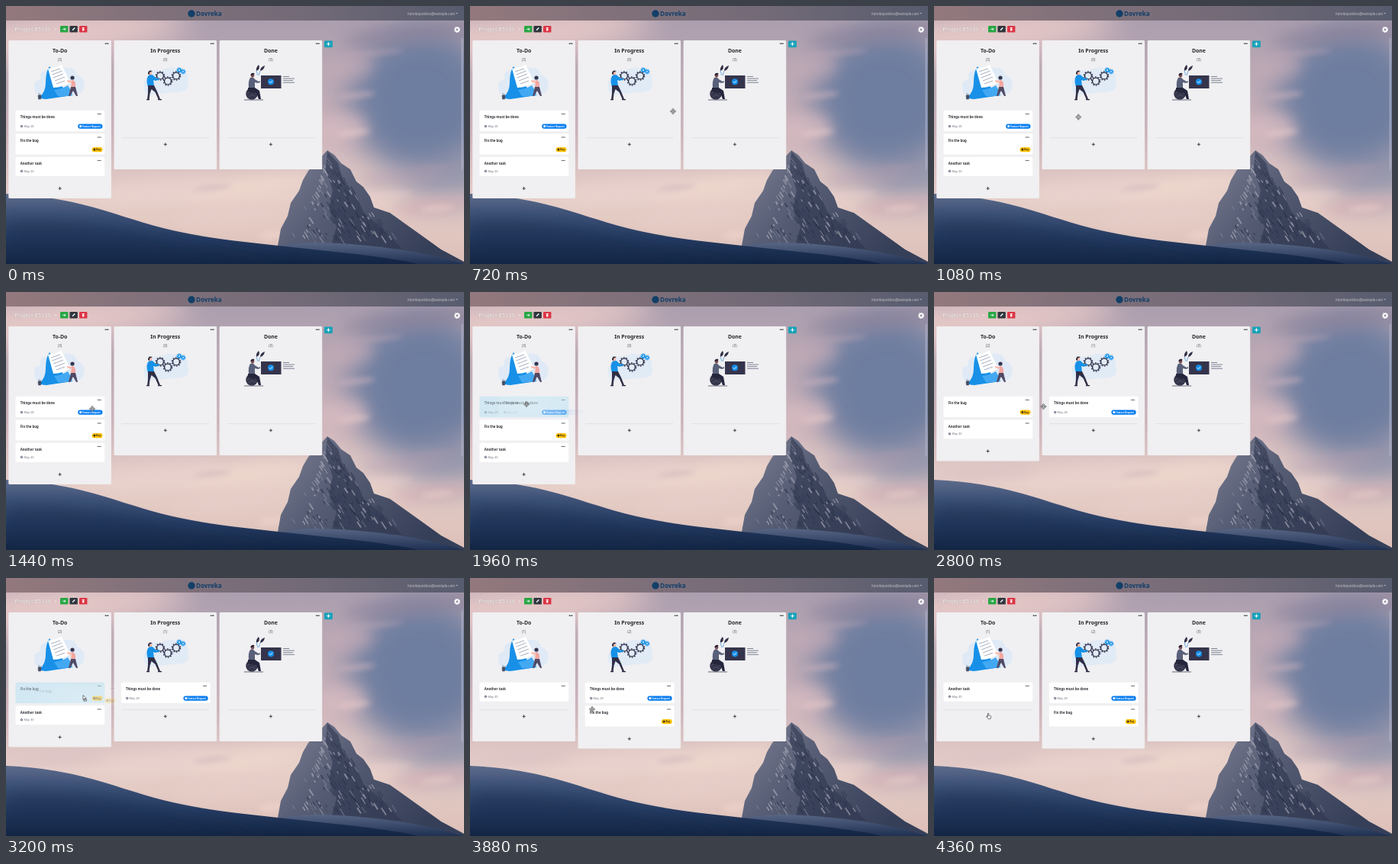
These frames come from a looping animation (600 by 338 pixels, 4.4 s). An HTML page:

```html
<!DOCTYPE html>
<html lang="en">
<head>
<meta charset="utf-8">
<title>Kanban board</title>
<style>
html, body { margin: 0; width: 100%; height: 100%; overflow: hidden; background: #a798a8; }
svg { display: block; width: 100%; height: 100%; font-family: "Noto Sans", "Open Sans", sans-serif; }
.title { font-size: 6.9px; font-weight: 600; fill: #24272c; text-anchor: middle; }
.count { font-size: 4.4px; fill: #55585e; text-anchor: middle; }
.name { font-size: 4.35px; font-weight: 600; fill: #2f3338; }
.date { font-size: 3.9px; fill: #70757f; }
.tag { font-size: 2.9px; font-weight: 700; }
</style>
</head>
<body>
<svg id="stage" viewBox="0 0 600 338" preserveAspectRatio="none">
  <defs>
    <linearGradient id="sky" x2="0" y2="1">
      <stop offset="0" stop-color="#a79bac"/><stop offset=".22" stop-color="#b7a6b3"/>
      <stop offset=".5" stop-color="#ccb3ba"/><stop offset=".74" stop-color="#e7d0c9"/>
      <stop offset="1" stop-color="#dcbfb8"/>
    </linearGradient>
    <linearGradient id="snow" x2="0" y2="1">
      <stop offset="0" stop-color="#5d6b8b"/><stop offset=".25" stop-color="#41557a"/>
      <stop offset=".65" stop-color="#243a60"/><stop offset="1" stop-color="#122442"/>
    </linearGradient>
    <linearGradient id="farSnow" x2="0" y2="1">
      <stop offset="0" stop-color="#586584"/><stop offset="1" stop-color="#1f3052"/>
    </linearGradient>
    <linearGradient id="rock" x2="1" y2=".5">
      <stop offset="0" stop-color="#85869a"/><stop offset=".45" stop-color="#565d74"/>
      <stop offset="1" stop-color="#363f58"/>
    </linearGradient>
    <linearGradient id="bar">
      <stop offset="0" stop-color="#93797d"/><stop offset=".35" stop-color="#7f707a"/>
      <stop offset=".65" stop-color="#736a77"/><stop offset="1" stop-color="#575c6e"/>
    </linearGradient>
    <filter id="haze" x="-50%" y="-60%" width="200%" height="220%"><feGaussianBlur stdDeviation="20"/></filter>
    <filter id="soft" x="-50%" y="-100%" width="200%" height="300%"><feGaussianBlur stdDeviation="9"/></filter>
    <filter id="wisp" x="-50%" y="-100%" width="200%" height="300%"><feGaussianBlur stdDeviation="3.5"/></filter>
    <radialGradient id="fade">
      <stop offset="0" stop-color="#fff"/><stop offset="1" stop-color="#fff" stop-opacity="0"/>
    </radialGradient>
    <mask id="halo" maskUnits="userSpaceOnUse" x="-80" y="-40" width="160" height="80">
      <ellipse rx="78" ry="38" fill="url(#fade)"/>
    </mask>
  </defs>

  <rect width="600" height="338" fill="url(#sky)"/>
  <g id="clouds"></g>
  <path d="M421 189L430 195 439 206 451 214 459 230 468 237 477 250 482 264 503 271 524 286 545 301 570 319 600 335V338H340L356 314 360 292 369 275 373 258 384 242 389 228 396 216 408 203z" fill="url(#rock)"/>
  <g id="ridges"></g>
  <path d="M330 322Q365 310 405 310T500 317 600 338H330z" fill="url(#farSnow)"/>
  <path d="M0 246Q52 248 100 260C140 270 170 282 206 291Q250 302 312 309T440 323 540 338H0z" fill="url(#snow)"/>
  <path d="M0 280Q90 274 180 300T390 338H0z" fill="#152a4c" opacity=".4" filter="url(#soft)"/>

  <rect width="600" height="19" fill="url(#bar)"/>
  <rect x="596.6" y="42" width="2" height="173" rx="1" fill="#b0b3c6" opacity=".7"/>
  <circle cx="243" cy="10" r="4.7" fill="#123f68"/>
  <text x="249" y="13.2" font-size="8.1" font-weight="700" fill="#123f68">Dovreka</text>
  <text x="588" y="11.6" font-size="4.6" font-style="italic" fill="#c3c2c9" text-anchor="end">harolinpostbox@example.com</text>
  <path d="M589.4 9h2.6l-1.3 1.5z" fill="#c3c2c9"/>
  <text x="11.5" y="33" font-size="7.4" fill="#fff" style="text-shadow: 0 0 1px #5558">Project 85139</text>
  <path d="M63.8 29.7h2.4l-1.2 1.4z" fill="#fff"/>
  <g fill="none" stroke="#fff" stroke-width=".9">
    <rect x="71" y="26" width="10.4" height="8.6" rx="1.2" fill="#28a745" stroke="none"/>
    <path d="M74.3 30.3h3.7m-1.5-1.5l1.5 1.5-1.5 1.5"/>
    <rect x="83.4" y="26" width="10.4" height="8.6" rx="1.2" fill="#30363d" stroke="none"/>
    <path d="M87 31.8l3.3-3.3" stroke-width="1.3"/>
    <rect x="96" y="26" width="10.4" height="8.6" rx="1.2" fill="#dc3545" stroke="none"/>
    <path d="M99.5 28.6h3.4m-1.7-.6v.5"/><path d="M100 29.4h2.4v3H100z" fill="#fff" stroke="none"/>
    <rect x="417" y="45.4" width="10.8" height="8.8" rx="1.2" fill="#17a2b8" stroke="none"/>
    <path d="M420.2 49.8h4.4m-2.2-2.2v4.4" stroke-width="1.1"/>
    <circle cx="591" cy="31" r="2.3" stroke-width="1.7"/>
    <circle cx="591" cy="31" r="3.5" stroke-width="1.1" stroke-dasharray="1.4 1.35"/>
  </g>

  <g id="columns"></g>

  <g transform="translate(37 76)">
    <path d="M0 30Q-1 22 8 20Q6 9 17 8Q28 1 39 5Q54 3 56 14Q68 19 65 31Q64 40 48 42L10 44Q0 40 0 30z" fill="#dfeaf6"/>
    <path d="M7 43Q15 37 15 24Q15 10 20 3L37 30Q40 41 50 41L16 46Q8 46 7 43z" fill="#1890e8"/>
    <path d="M18 6Q27 5 36 1L47 24Q37 31 25 31z" fill="#fff"/>
    <path d="M22 10l12-4M23.5 14l13-5M25 18l13-5M27 22l13-5M29 26l11-4" stroke="#8d99ae" stroke-width=".8"/>
    <path d="M26 34q10-1 18-6 5 8 6 13-11 2-19 1z" fill="#43a8f2"/>
    <path d="M43 21l6 1-1 3-5-2z" fill="#ffbbad"/>
    <circle cx="50" cy="18" r="2.6" fill="#34344e"/>
    <path d="M49 21q6 0 5 9l-6 1z" fill="#f3a7a0"/>
    <path d="M48 30h6l3 12h-2l-4-7-4 7h-2z" fill="#514a66"/>
    <path d="M5 41h4l-.5 5h-3zM7 42l-1-4m1 4l2-3" fill="#454d64" stroke="#454d64" stroke-width=".6"/>
  </g>

  <g transform="translate(178 76)">
    <path d="M3 31Q1 21 10 17Q9 6 24 9Q39 1 49 9Q62 9 60 22Q64 33 52 36L12 40Q4 40 3 31z" fill="#e1ebf6"/>
    <g id="gears" fill="none"></g>
    <path d="M8 16q3-4 7-1l4 4 4-1v2l-5 2-3-1 1 8-8 1q-3-9 0-14z" fill="#1691e8"/>
    <circle cx="11" cy="12" r="2.4" fill="#ffb9a8"/><path d="M8 13q0-6 6-4l-4 2v3z" fill="#29293f"/>
    <path d="M8 28h8l4 8 4 10h-2.5l-4-9-5-4-2 6-1 8H7l1-9z" fill="#2f2e47"/>
    <path d="M6 46.6h4m11 0h5" stroke="#26263c" stroke-width="1.2"/>
  </g>

  <g transform="translate(312 76)">
    <path d="M16 9q-1-4 3-8 3 5-3 8zM21 9q0-5 6-7-1 6-6 7z" fill="#2f2e47"/>
    <path d="M16 9l2 6m3-6l-2 6" stroke="#2089df" stroke-width=".6"/>
    <circle cx="10" cy="39" r="7.8" fill="#35354b"/><path d="M4 39q6-7 12 0m-10 4q5-5 9 0" fill="none" stroke="#555970" stroke-width=".8"/>
    <circle cx="11" cy="15" r="2.4" fill="#7f4e50"/><path d="M8.5 15q0-4 5-3l-1 2z" fill="#222238"/>
    <path d="M8 18q4-2 6 2l5 3 2-1v2l-3 1-4-1v7H6q-1-9 2-13z" fill="#59607a"/>
    <path d="M5 31h9l6 4 2 11h-3l-3-8-7-1-4-1z" fill="#25263d"/>
    <path d="M0 47h25" stroke="#42455d" stroke-width=".8"/>
    <rect x="22" y="15" width="26.5" height="17" fill="#34344c"/>
    <circle cx="35" cy="23.2" r="4" fill="#168ee9"/>
    <path d="M33 23.2l1.5 1.6 2.7-3" fill="none" stroke="#fff" stroke-width=".9"/>
    <path d="M51 16.5h8m-8 2.6h15m-15 2.6h13m-13 2.6h15" stroke="#626b7d" stroke-width=".8"/>
  </g>

  <g id="cards"></g>
  <g id="drag" mask="url(#halo)"><use id="dragCard"/></g>
  <g id="cursor">
    <path id="moveIcon" d="M0-3.8l1.3 1.6H.6V-.6h1.6v-.7L3.8 0 2.2 1.3V.6H.6v1.6h.7L0 3.8-1.3 2.2h.7V.6h-1.6v.7L-3.8 0l1.6-1.3v.7h1.6v-1.6h-.7z" fill="#fff" stroke="#25282d" stroke-width=".6"/>
    <g id="arrowIcon" stroke="#25282d" stroke-width=".6" fill="#fff"><path d="M-1-3.5v6l1.5-1.4 1 2.2.9-.4-1-2.1h2z"/><path d="M0 2.2h3.5v2H0z"/></g>
    <path id="handIcon" d="M-.9-3.5q.8-.7 1.3 0v2.4l2.6.8q.6.4.3 1.4L2.7 3.6H-.4l-2-3q.2-1 1.5.1z" fill="#fff" stroke="#25282d" stroke-width=".6"/>
  </g>
</svg>
<script>
const $ = id => document.getElementById(id);
const LOOP = 4400, SLIDE = 150, TOP = 136.8, GAP = 3.3;
const COL_X = [3.3, 141.5, 279.6];

const CARDS = {
  things: { name: 'Things must be done', date: 'May 28', height: 27.2, dateY: 22.1, tag: ['Feature Request', 32.3, '#087df1', '#fff'] },
  fix: { name: 'Fix the bug', height: 27.2, tag: ['Bug', 14, '#ffc107', '#3c3316'] },
  another: { name: 'Another task', date: 'May 30', height: 25, dateY: 19.8 }
};

// Board order after each move, with the time the move takes effect.
const ORDERS = [
  { at: 0, lists: [['things', 'fix', 'another'], [], []] },
  { at: 2280, lists: [['fix', 'another'], ['things'], []] },
  { at: 3480, lists: [['another'], ['things', 'fix'], []] }
];
const DRAGS = [
  { card: 'things', from: 1760, to: 2600 },
  { card: 'fix', from: 3100, to: 3700 }
];
// Pointer stops: time, x, y
const PATH = [
  [0, 616, 150], [200, 606, 150], [720, 266, 138], [1440, 113, 153], [1760, 49, 147],
  [2000, 76, 147], [2280, 170, 145], [2400, 181, 145], [2600, 186, 147],
  [3040, 88, 154], [3100, 85, 154], [3200, 102, 157], [3480, 150, 170],
  [3700, 162, 174], [3880, 160, 172], [4240, 73, 181], [4400, 71, 181]
];

const clamp = v => Math.max(0, Math.min(1, v));
const mix = (a, b, p) => a + (b - a) * p;
const easeOut = p => 1 - (1 - p) ** 2;
const smooth = p => p * p * (3 - 2 * p);
const show = (id, on) => $(id).setAttribute('visibility', on ? 'visible' : 'hidden');
const move = (el, x, y) => el.setAttribute('transform', `translate(${x.toFixed(2)} ${y.toFixed(2)})`);
const dots = (x, y, r = .65) => [-1.7, 0, 1.7].map(d => `<circle cx="${x + d}" cy="${y}" r="${r}" fill="#24272c"/>`).join('');

function drawScenery() {
  const hazes = [
    [50, 40, 190, 30, '#edcdca', .95], [545, 125, 95, 95, '#6b7b9f', .95], [590, 225, 70, 35, '#8189a6', .7]
  ];
  const clouds = [
    [540, 36, 100, 12, '#8a8099', .6], [448, 80, 34, 16, '#c6acb8', .6], [440, 160, 34, 18, '#d9bcc2', .7],
    [520, 225, 60, 10, '#b29fb0', .6], [560, 262, 55, 12, '#d1afb5', .75],
    [320, 236, 85, 13, '#f0d9ce', .8], [200, 240, 80, 12, '#e9d3cf', .8], [60, 239, 70, 9, '#d8bfc5', .6],
    [290, 275, 75, 14, '#e8cec8', .7]
  ];
  const wisps = [
    [480, 62, 40, 3, '#b9a4b3'], [458, 117, 26, 4, '#cdb3bd'], [455, 166, 22, 4, '#e8cbc9'],
    [560, 212, 34, 3, '#a497ab'], [500, 248, 32, 3, '#e3c9ca'], [565, 265, 22, 4, '#ecd0cb'],
    [350, 300, 20, 5, '#f0d5cc'], [270, 238, 25, 3, '#c8aeb8']
  ];
  const ellipses = (list, filter) => list.map(([x, y, rx, ry, fill, opacity = .6]) =>
    `<ellipse cx="${x}" cy="${y}" rx="${rx}" ry="${ry}" fill="${fill}" opacity="${opacity}" filter="url(#${filter})" transform="rotate(-6 ${x} ${y})"/>`).join('');
  $('clouds').innerHTML = ellipses(hazes, 'haze') + ellipses(clouds, 'soft') + ellipses(wisps, 'wisp');

  let seed = 17;
  const random = () => (seed = seed * 16807 % 2147483647) / 2147483647;
  let streaks = '<path d="M421 190l14 16 7 24 16 17 11 24 23 20 27 27H425l8-29-10-22 5-25-9-28z" fill="#2f3850" opacity=".6"/>';
  for (let i = 0; i < 150; i++) {
    const depth = Math.sqrt(random()), y = 198 + depth * 105;
    const side = random(), x = 421 - depth * 50 + side * depth * 140;
    const length = 2 + random() * 8, light = random() > .35 + side * .4;
    streaks += `<path d="M${x.toFixed(1)} ${y.toFixed(1)}l${(length * .65).toFixed(1)} ${length.toFixed(1)}" stroke="${light ? '#b6b3c0' : '#2a334a'}" stroke-width="${(.6 + random() * 1.5).toFixed(1)}" opacity=".6"/>`;
  }
  $('ridges').innerHTML = streaks;
}

function drawGears() {
  const gear = (x, y, r, color, rim) =>
    `<g stroke="${color}"><circle cx="${x}" cy="${y}" r="${r}" stroke-width="${rim}"/>` +
    `<circle cx="${x}" cy="${y}" r="${r + 1.2}" stroke-width="1.4" stroke-dasharray="${(r + 1.2) * Math.PI / 10}"/></g>`;
  $('gears').innerHTML = gear(24, 15.5, 4.4, '#34344c', 1.4) + gear(34, 22.5, 4.4, '#34344c', 1.4) +
    gear(45, 15.5, 4.4, '#34344c', 1.4) + gear(49, 8, 1.8, '#1795ec', 1.6) + gear(54, 10, 1.6, '#1795ec', 1.4);
}

function drawColumns() {
  $('columns').innerHTML = ['To-Do', 'In Progress', 'Done'].map((title, i) => `
    <g transform="translate(${COL_X[i]} 0)">
      <rect id="panel${i}" y="45" width="134.6" rx="1.5" fill="#f0eff1"/>
      ${dots(128.7, 49.2, .75)}
      <text class="title" x="67.3" y="61.2">${title}</text>
      <text class="count" id="count${i}" x="67.3" y="72.4"></text>
      <path d="M10 172.6h115" stroke="#dcdcdf" stroke-width=".7"/>
      <path id="plus${i}" d="M65.2 0h4.2m-2.1-2.1v4.2" stroke="#303338" stroke-width=".9"/>
    </g>`).join('');
}

function drawCards() {
  $('cards').innerHTML = Object.entries(CARDS).map(([id, card]) => {
    let body = `<text class="name" x="6.2" y="10.5">${card.name}</text>${dots(109.8, 4.6, .6)}`;
    if (card.date) body += `<circle cx="8" cy="${card.dateY - 1.4}" r="1.7" fill="#7b8292"/>
      <path d="M8 ${card.dateY - 2.4}v1.1h.8" stroke="#fff" stroke-width=".4" fill="none"/>
      <text class="date" x="10.9" y="${card.dateY}">${card.date}</text>`;
    if (card.tag) {
      const [label, width, fill, ink] = card.tag, x = 114 - width;
      body += `<rect x="${x}" y="17.6" width="${width}" height="6.4" rx="3.2" fill="${fill}"/>
        <circle cx="${x + 3.4}" cy="20.8" r="1.5" fill="${ink}"/>
        <text class="tag" x="${x + 5.8}" y="21.9" fill="${ink}">${label}</text>`;
    }
    return `<g id="${id}"><g id="${id}Face"><rect width="116.8" height="${card.height}" rx="1.6"/><g id="${id}Body">${body}</g></g></g>`;
  }).join('');
}

function slots(lists) {
  const places = {};
  const ends = lists.map((list, i) => {
    let y = TOP;
    for (const id of list) {
      places[id] = [COL_X[i] + 9.2, y];
      y += CARDS[id].height + GAP;
    }
    return y - GAP;
  });
  return { places, ends };
}

function pointer(t) {
  const i = Math.max(1, PATH.findIndex(p => p[0] >= t));
  const a = PATH[i - 1], b = PATH[i], p = smooth(clamp((t - a[0]) / (b[0] - a[0])));
  return [mix(a[1], b[1], p), mix(a[2], b[2], p)];
}

function render(t) {
  const step = ORDERS.findLastIndex(o => t >= o.at);
  const now = slots(ORDERS[step].lists), before = slots(ORDERS[Math.max(0, step - 1)].lists);
  const slide = easeOut(clamp((t - ORDERS[step].at) / SLIDE));
  const drag = DRAGS.find(d => t >= d.from && t < d.to);

  const dropped = DRAGS.filter(d => t >= d.to).length;
  [3 - dropped, dropped, 0].forEach((count, i) => {
    const foot = Math.max(181.3, now.ends[i] + 16.2);
    $('panel' + i).setAttribute('height', Math.max(214, foot + 12.9) - 45);
    $('count' + i).textContent = `(${count})`;
    move($('plus' + i), 0, foot);
  });

  for (const id in CARDS) {
    const [x0, y0] = before.places[id], [x1, y1] = now.places[id];
    const ghost = drag && drag.card === id;
    move($(id), mix(x0, x1, slide), mix(y0, y1, slide));
    $(id).setAttribute('fill', ghost ? '#d2e8f3' : '#fff');
    $(id + 'Body').setAttribute('opacity', ghost ? .55 : 1);
  }

  const [x, y] = pointer(t);
  show('drag', drag);
  if (drag) {
    const [gx, gy] = pointer(drag.from);
    const home = slots(ORDERS[DRAGS.indexOf(drag)].lists).places[drag.card];
    move($('drag'), x, y);
    move($('dragCard'), home[0] - gx, home[1] - gy);
    $('dragCard').setAttribute('href', `#${drag.card}Face`);
    $('dragCard').setAttribute('fill', 'rgba(255,255,255,.25)');
    $('dragCard').setAttribute('opacity', .8);
  }
  move($('cursor'), x, y);
  const hand = t > 4200, arrow = drag && drag.card === 'fix';
  show('handIcon', hand);
  show('arrowIcon', arrow);
  show('moveIcon', !hand && !arrow);
}

drawScenery();
drawGears();
drawColumns();
drawCards();
const start = performance.now();
function tick() {
  render((performance.now() - start) % LOOP);
  requestAnimationFrame(tick);
}
tick();
</script>
</body>
</html>
```
